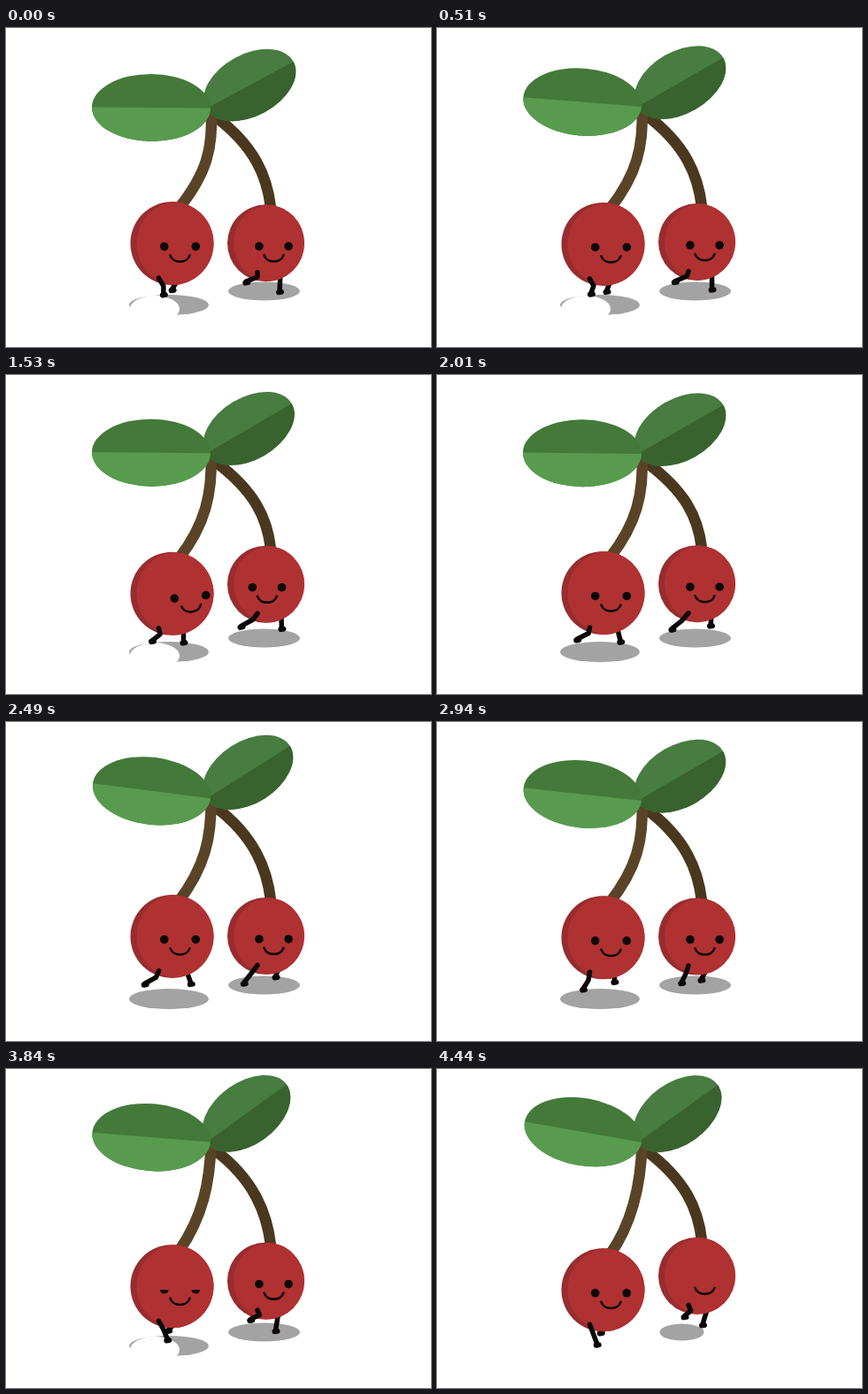
Write an HTML page with a canvas that moves like this. It is 480 px wide and 360 px high and loops after 4.5 s.

```html
<!DOCTYPE html>
<html lang="en">
<head>
<meta charset="utf-8">
<title>Walking cherries</title>
<style>
  html, body { margin: 0; width: 100%; height: 100%; overflow: hidden; background: #fff; }
  canvas { display: block; }
</style>
</head>
<body>
<canvas id="stage" width="480" height="360"></canvas>
<script>
const g = document.getElementById("stage").getContext("2d");
const LOOP = 4500, STRIDE = 540, TICK = 30;
const RAD = Math.PI / 180;
const INK = "#0d0808";

// Moments at which each leaf hangs lowest
const LEFT_DIPS = [0, 660, 1530, 2000, 2340, 2810, 3270, 3740, 4180, 4700];
const RIGHT_DIPS = [0, 600, 1440, 1950, 2360, 2860, 3360, 3600, 4080, 4740];

// Swings of the form [middle, amplitude, peak in degrees of the stride];
// feet and hips are measured from the centre of the cherry
const LEFT = {
  x: 187.5, r: 47, bob: [[245.2, -3.2, 10], [0, 1.8, 60]],
  hip: [-15, 39], reach: 61, backHip: 13,
  front: { x: [-18, 13, 50], y: [56.5, 4.5, 85] },
  back: { x: [8.5, 13, 230], y: [51, 3.5, 280] }
};
const RIGHT = {
  x: 293.5, r: 43.5, bob: [[238.7, 4.8, 5], [0, -1.2, 60]],
  hip: [-9.5, 33], reach: 53, backHip: 17,
  front: { x: [-21, 7.5, 100], y: [48, 5, 200] },
  back: { x: [11, 7, 310], y: [50.5, 5, 45] }
};

const swing = ([mid, size, peak], angle) => mid + size * Math.cos((angle - peak) * RAD);
const clamp = v => Math.max(0, Math.min(1, v));

function ease(t, from, to) {
  const k = clamp((t - from) / (to - from));
  return k * k * (3 - 2 * k);
}

// 0 at each dip, 1 halfway between two dips
function flap(dips, t) {
  const i = dips.findIndex(d => d > t);
  const k = (t - dips[i - 1]) / (dips[i] - dips[i - 1]);
  return (1 - Math.cos(2 * Math.PI * k)) / 2;
}

// How far the eyes are open; times are the middles of the blinks
function openness(t, times, least) {
  return Math.max(least, Math.min(1, ...times.map(c => Math.abs(t - c) / 100)));
}

// The body bounces twice per stride, with a slight limp
function height(body, angle) {
  const [bounce, limp] = body.bob;
  const [mid, size, peak] = bounce;
  return swing([mid, size, 2 * peak], 2 * angle) + swing(limp, angle);
}

function oval(x, y, rx, ry, color, from = 0, to = 2 * Math.PI) {
  g.fillStyle = color;
  g.beginPath();
  g.ellipse(x, y, rx, ry, 0, from, to);
  g.fill();
}

function line(points, width) {
  g.strokeStyle = INK;
  g.lineWidth = width;
  g.lineCap = g.lineJoin = "round";
  g.beginPath();
  points.forEach(([x, y]) => g.lineTo(x, y));
  g.stroke();
}

function stem(x, y, curve, color) {
  g.strokeStyle = color;
  g.lineWidth = 12.5;
  g.lineCap = "butt";
  g.beginPath();
  g.moveTo(x, y);
  g.bezierCurveTo(...curve);
  g.stroke();
}

function leaf(x, y, angle, cx, rx, ry, upper, lower) {
  g.save();
  g.translate(x, y);
  g.rotate(angle * RAD);
  oval(cx, 0, rx, ry, upper);
  oval(cx, 0, rx, ry, lower, 0, Math.PI);
  g.restore();
}

function shadows(phase) {
  const grey = "#a3a3a3";
  const worn = phase >= 90 && phase < 210;
  if (worn) {
    oval(276.5, 297, 25, 9.5, grey);
    return;
  }
  oval(291.5, 297, 40.5, 10.5, grey);
  oval(184, 312.5, 45, 11.5, grey);
  const whole = phase >= 210 && phase < 420;
  if (!whole) oval(168, 317, 28, 15, "#fff");
}

function leg(points) {
  const [x, y] = points[points.length - 1];
  line(points, 5.5);
  line([[x - 1, y + 1.5], [x + 2, y + 1]], 6);
}

function face(x, y, look, tilt, open, spread) {
  g.save();
  g.translate(x + 9 + look, y + 8);
  g.rotate(tilt * RAD);
  if (open > 0) {
    g.save();
    g.beginPath();
    g.rect(-30, 0.5 - 10 * open, 60, 20);
    g.clip();
    oval(-spread, -4.5, 4.8, 4.8, INK);
    oval(spread, -4.5, 4.8, 4.8, INK);
    g.restore();
  }
  g.strokeStyle = INK;
  g.lineWidth = 2.5;
  g.lineCap = "round";
  g.beginPath();
  g.moveTo(-11, 5.5);
  g.bezierCurveTo(-8, 15, 8, 15, 11, 5.5);
  g.stroke();
  g.restore();
}

function cherry(body, y, angle, drawFace) {
  const { x, r, hip, reach, backHip, front, back } = body;
  const foot = path => [x + swing(path.x, angle), y + swing(path.y, angle)];
  const [fx, fy] = foot(front);
  const [bx, by] = foot(back);
  const hx = x + hip[0], hy = y + hip[1];
  const bend = Math.max(0, reach - (fy - y)) * 0.65;

  leg([[(x + backHip + bx) / 2, y + r - 6], [bx, by]]);
  oval(x, y, r, r, "#982c2f");
  g.save();
  g.beginPath();
  g.arc(x, y, r, 0, 2 * Math.PI);
  g.clip();
  oval(x + 7, y, r, r, "#b03131");
  g.restore();
  drawFace(x, y);
  leg([[hx, hy], [(hx + fx) / 2 + bend, (hy + fy) / 2], [fx, fy]]);
}

function draw(t) {
  const phase = t % STRIDE;
  const angle = 360 * phase / STRIDE;
  const ly = height(LEFT, angle);
  const ry = height(RIGHT, angle);
  const leftLift = flap(LEFT_DIPS, t);
  const rightLift = flap(RIGHT_DIPS, t);
  const joint = 91 - 8 * rightLift;
  const sway = 4 * rightLift;
  const turn = ease(t, 600, 900);
  const lookL = 12 * turn * (1 - ease(t, 1550, 1950));
  const lookR = -14 * turn * (1 - ease(t, 1200, 1900));

  g.fillStyle = "#fff";
  g.fillRect(0, 0, 480, 360);
  shadows(phase);

  stem(235, joint + 8, [281, joint + 42, 295, ry - 75, 299, ry - 40], "#4a381e");
  stem(231.5, joint, [234.5 - sway, joint + 45, 226 - sway, ly - 78, 195.5, ly - 40], "#5a4428");

  leaf(226, joint, -28.3 - 7.5 * rightLift, 56, 56, 35, "#487c41", "#38622e");
  leaf(231, joint - 0.5, 0.5 + 9.5 * leftLift, -67, 67, 38, "#44793a", "#589b4f");

  cherry(LEFT, ly, angle, (x, y) =>
    face(x, y, lookL, -lookL / 2, openness(t, [850, 3885], 0.4), 17.8));
  cherry(RIGHT, ry, angle, (x, y) =>
    face(x, y, lookR, 0, openness(t, [930, 4440], 0), 16.6));
}

const start = performance.now();
function frame() {
  const t = (performance.now() - start) % LOOP;
  draw(Math.floor(t / TICK) * TICK);
  requestAnimationFrame(frame);
}
frame();
</script>
</body>
</html>
```
